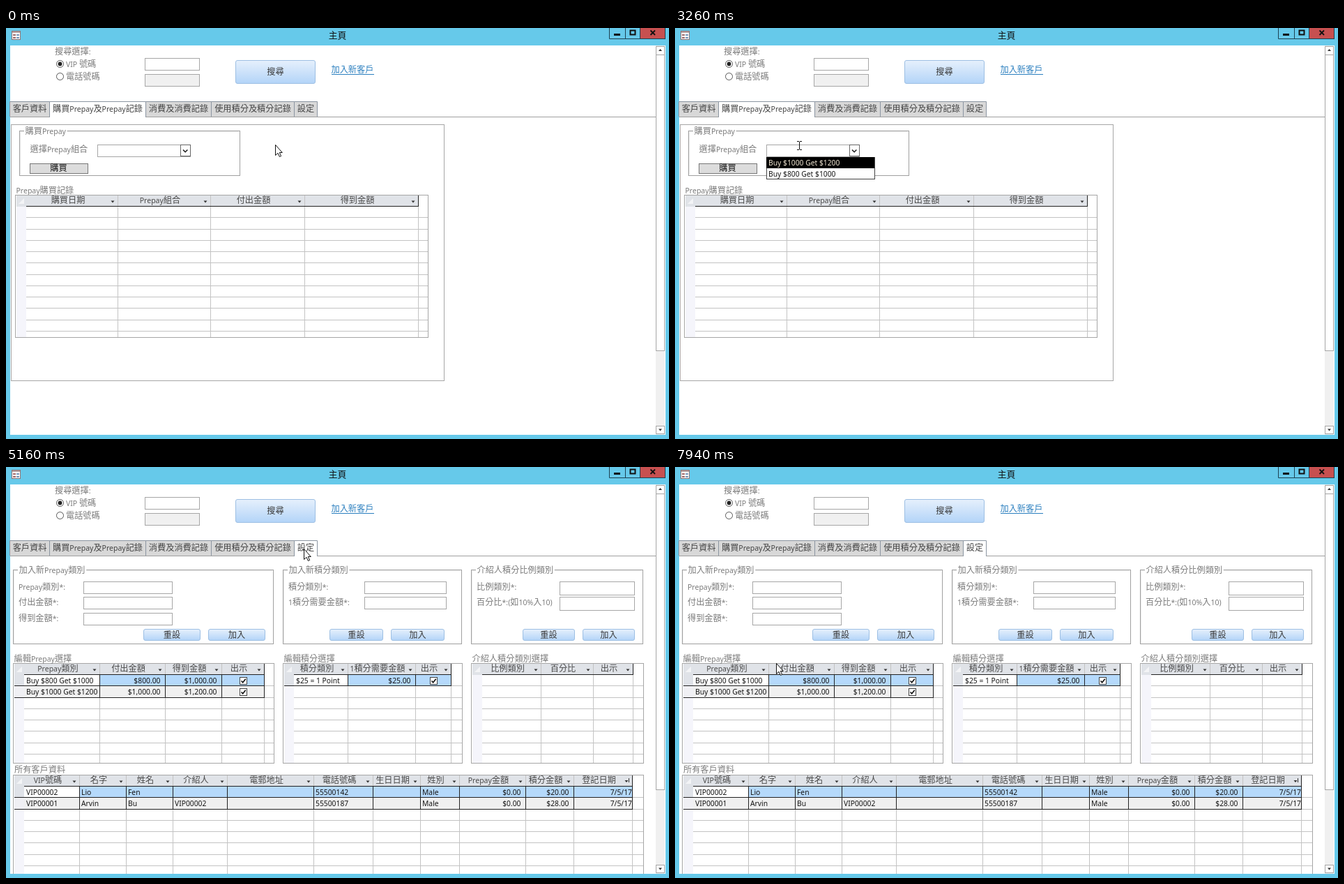
An HTML page for the animation above (8 s loop, 951x589 px).

```html
<!DOCTYPE html>
<html lang="zh-Hant">
<head>
<meta charset="utf-8">
<title>主頁</title>
<style>
  html, body { margin: 0; width: 100%; height: 100%; overflow: hidden; background: #66c9ea; }
  svg { display: block; }
  text { font-family: "Noto Sans CJK TC", "Noto Sans CJK", sans-serif; }
  tspan { font-family: "Noto Sans", "Open Sans", sans-serif; font-size: .86em; }
</style>
</head>
<body>
<svg id="stage" width="951" height="589" viewBox="0 0 951 589"></svg>
<script>
const LOOP = 8000, STEP = 78, BLINK = 530;
const PRESS = 1840, LIST_OPEN = 1900, SWITCH = 5030, FILLED = 5160;
const GREY = '#7c7c7c', INK = '#161616', LINE = '#a6a6a6', CELL = '#c3c3c3', DARK = '#222';
const EM = 12.2, ROW = 16.27;

// Drawing helpers: each returns SVG markup
const rect = (x, y, w, h, fill, stroke, extra = '') => stroke
  ? `<rect x="${x + .5}" y="${y + .5}" width="${w - 1}" height="${h - 1}" fill="${fill}" stroke="${stroke}" ${extra}/>`
  : `<rect x="${x}" y="${y}" width="${w}" height="${h}" fill="${fill}" ${extra}/>`;
const path = (d, stroke, fill = 'none', extra = '') =>
  `<path d="${d}" stroke="${stroke}" fill="${fill}" ${extra}/>`;
const hline = (x1, x2, y, c) => path(`M${x1} ${y + .5}H${x2}`, c);
const vline = (x, y1, y2, c) => path(`M${x + .5} ${y1}V${y2}`, c);
const text = (s, x, cy, fill = GREY, anchor = 'start', size = EM) =>
  `<text x="${x}" y="${cy + 4.3}" fill="${fill}" font-size="${size}" text-anchor="${anchor}">` +
  s.replace(/[\x20-\x7e]+/g, '<tspan>$&</tspan>') + '</text>';
const textWidth = s => [...s].reduce((w, c) => w + (c < '\x7f' ? 5.7 : EM), 0);
const group = (id, ...parts) => `<g id="${id}">${parts.join('')}</g>`;
const triangle = (x, y, flip = 1) => path(`M${x - 2.5} ${y - flip}h5l-2.5 ${3 * flip}z`, 'none', '#333');
const inside = (x, y, [l, t, w, h]) => x >= l && x < l + w && y >= t && y < t + h;

// Every input is remembered, so the pointer can turn into a text beam over it
let fields = [];
function input(x, y, w, h, fill = '#fff') {
  fields.push([x, y, w, h]);
  return rect(x, y, w, h, fill, LINE);
}

const button = (x, y, w, h, label) =>
  rect(x, y, w, h, 'url(#blue)', '#9dbfe3', 'rx="2.5"') + text(label, x + w / 2, y + h / 2, '#3a3a3a', 'middle');

function fieldset(x, y, w, h, label) {
  return rect(x, y, w, h, 'none', '#a0a0a0') +
    path(`M${x + 1.5} ${y + h - 2}V${y + 1.5}H${x + w - 2}`, '#ececec') +
    rect(x + 7, y - 1, textWidth(label) + 3, 4, '#fff') + text(label, x + 8.5, y + 1);
}

function checkbox(x, y) {
  return rect(x - 5, y - 5, 11, 11, '#fff', '#444') +
    path(`M${x - 2.5} ${y + .5}l2.2 2.3 4-5`, '#111', 'none', 'stroke-width="1.7"');
}

function cell(v, left, right, cy) {
  if (v === 'on') return checkbox(Math.round((left + right) / 2), cy);
  if (/^\$[\d,]+\.\d\d$/.test(v)) return text(v, right - 6.5, cy, INK, 'end', 12);
  if (/\//.test(v)) return text(v, right, cy, INK, 'end', 12);
  return text(v, left + 3, cy, INK, 'start', 12);
}

// columns: { label: width }
function grid(x, y, w, h, columns, rows = [], sorted = false) {
  const left = x + 15, head = y + 16, bottom = y + h;
  const rowY = k => Math.round(head + ROW * k);
  let last = left;
  const cols = Object.entries(columns).map(([label, width]) => ({ label, a: last, b: last += width }));

  let s = rect(x, y, w, h, '#fff') + rect(x + 1, head, 14, bottom - head, '#f5f5fb') +
    rect(x + 1, y + 1, last - x, 16, '#e0e3e8') + path(`M${x + 12} ${y + 5}v8h-8z`, 'none', '#f3f4f6');
  for (let k = 1; rowY(k) < bottom; k++) s += hline(left, x + w, rowY(k), CELL);
  for (const { b } of cols) s += vline(b, y + 1, bottom, CELL);

  rows.forEach((row, k) => {
    const top = rowY(k) + 1, size = rowY(k + 1) - top;
    s += rect(x + 1, top, 14, size, k ? '#f0f0f4' : '#dfe2e8');
    row.forEach((v, i) => {
      const { a, b } = cols[i];
      s += rect(a + (i > 0), top, b - a, size, k ? '#f0f0f0' : i ? '#b5d9fb' : '#fff') +
        vline(b, top, top + size, DARK) + cell(v, a, b, top + 8);
    });
    s += hline(x + 1, last + 1, top + size, DARK);
  });

  cols.forEach(({ label, a, b }, i) => {
    s += text(label, (a + b) / 2 - 5.5, y + 8, '#4a4a4a', 'middle');
    if (sorted && i === cols.length - 1) s += path(`M${b - 4.5} ${y + 5}v6`, '#333') + triangle(b - 8, y + 9);
    else s += triangle(b - 7, y + 9.5);
  });
  return s + hline(left, last + 1, head, DARK) + vline(last, y + 1, head, DARK) + rect(x - 1, y, w + 1, h + 1, 'none', LINE);
}

// Window, scroll bar and search bar
const icon = rect(8, 4, 13, 13, '#fff', '#8d7373') + rect(9, 5, 11, 2, '#b9a2a2') +
  [9, 13].map(y => rect(10, y, 4, 2, '#a06a6a') + rect(15, y, 4, 2, '#7796b8')).join('');

const windowBar =
  rect(0, 0, 951, 589, '#66c9ea') + rect(6, 25, 940, 558, '#fff') + icon +
  text('主頁', 475.5, 11, '#111', 'middle', 12.8) +
  rect(909, 0, 37, 15, '#c75050') + path('M865.5 0V15.5H946M888.5 0V15M909.5 0V15M945.5 0V15', '#1d4252') +
  rect(872, 8, 9, 3, '#111') + path('M895.5 3.5h7v6h-7z', '#111', 'none', 'stroke-width="2"') +
  path('M924.5 3.5l6.5 6.5M931 3.5l-6.5 6.5', '#111', 'none', 'stroke-width="1.8"');

const scroll =
  rect(932, 25, 13, 558, '#f0f0f0') + rect(932, 26, 13, 13, '#fff', LINE) +
  rect(932, 38, 13, 425, '#fff', LINE) + rect(932, 570, 13, 12, '#fff', LINE) +
  triangle(938.5, 32, -1) + triangle(938.5, 575.5);

const radio = (y, on) => `<circle cx="77.5" cy="${y}" r="5" fill="#fff" stroke="#555"/>` +
  (on ? `<circle cx="77.5" cy="${y}" r="2.9" fill="#222"/>` : '');

const search =
  text('搜尋選擇:', 70, 34) + radio(51.5, true) + text('VIP 號碼', 86, 52) +
  radio(69.5) + text('電話號碼', 86, 70) +
  input(199, 43, 79, 18) + input(199, 66, 79, 18, '#f0f0f0') +
  button(329, 46, 115, 34, '搜尋') +
  text('加入新客戶', 466.5, 60, '#2b7fbf') + hline(467, 528, 66, '#2b7fbf');

// Tabs are as wide as their names
let tabEnd = 5;
const tabBoxes = ['客戶資料', '購買Prepay及Prepay記錄', '消費及消費記錄', '使用積分及積分記錄', '設定'].map(name => {
  const a = Math.round(tabEnd);
  tabEnd += textWidth(name) + 8.6;
  return { name, a, b: Math.round(tabEnd) };
});
const tabs = hline(6, 932, 127, '#a0a0a0') + tabBoxes.map(({ name, a, b }) =>
  `<path class="tab" stroke="#8b95a1"/>` + text(name, (a + b) / 2 + .5, 116, '#444', 'middle')).join('');

// Purchase page
fields = [];
const DROP = [250, 167, 15, 17];
const purchase = group('purchase',
  rect(7, 138, 622, 368, '#fff', LINE),
  fieldset(19, 147, 317, 65, '購買Prepay'),
  text('選擇Prepay組合', 34.5, 174),
  input(131, 167, 134, 18),
  `<rect id="drop" x="250.5" y="167.5" width="14" height="16"/>`,
  path('M254 174.5l3.2 3.2 3.2-3.2', DARK, 'none', 'stroke-width="1.6"'),
  rect(34, 194, 84, 15, '#dcdcdc', '#777'), text('購買', 75.5, 201, INK, 'middle'),
  text('Prepay購買記錄', 14.5, 233),
  grid(14, 239, 592, 204, { 購買日期: 131, Prepay組合: 133, 付出金額: 135, 得到金額: 163 }),
  group('caret', rect(132, 167, 1, 15, '#000')));
const purchaseFields = fields;

const list = group('list', rect(131, 185, 156, 32, '#fff', '#444'),
  ['Buy $1000 Get $1200', 'Buy $800 Get $1000'].map((s, i) =>
    `<g class="item">${rect(131, 185 + 16 * i, 155, 16, '#000')}${text(s, 134, 193 + 16 * i, INK, 'start', 12)}</g>`).join(''));

// Settings page: three panels, each with a table below, and a wide table
fields = [];
const panels = [
  { x: 10, w: 374, title: '加入新Prepay類別', labels: ['Prepay類別*:', '付出金額*:', '得到金額*:'],
    inset: 101, field: 128, tall: 18, action: 82, pad: 12, caption: '編輯Prepay選擇',
    columns: { Prepay類別: 108, 付出金額: 94, 得到金額: 81, 出示: 61 },
    rows: [['Buy $800 Get $1000', '$800.00', '$1,000.00', 'on'], ['Buy $1000 Get $1200', '$1,000.00', '$1,200.00', 'on']] },
  { x: 397, w: 257, title: '加入新積分類別', labels: ['積分類別*:', '1積分需要金額*:'],
    inset: 117, field: 118, tall: 18, action: 77, pad: 25, caption: '編輯積分選擇',
    columns: { 積分類別: 77, '1積分需要金額': 97, 出示: 51 },
    rows: [['$25 = 1 Point', '$25.00', 'on']] },
  { x: 667, w: 247, title: '介紹人積分比例類別', labels: ['比例類別*:', '百分比*:(如10%入10)'],
    inset: 127, field: 108, tall: 20, action: 75, pad: 12, caption: '介紹人積分類別選擇',
    columns: { 比例類別: 84, 百分比: 75, 出示: 57 } }
];

function panel(p) {
  const add = p.x + p.w - p.pad - p.action;
  return fieldset(p.x, 147, p.w, 107, p.title) +
    p.labels.map((label, i) => text(label, p.x + 8, 171.5 + 22.5 * i) +
      input(p.x + p.inset, Math.floor(164 + 22.5 * i), p.field, p.tall)).join('') +
    button(add - p.action - 11, 232, p.action, 17, '重設') + button(add, 232, p.action, 17, '加入') +
    text(p.caption, p.x + 1.5, 275);
}
const panelGrid = p => grid(p.x + 1, 281, p.w, 143, p.columns, p.rows);
const clients = grid(11, 441, 904, 150,
  { VIP號碼: 79, 名字: 67, 姓名: 67, 介紹人: 78, 電郵地址: 124, 電話號碼: 85, 生日日期: 68, 姓別: 56, Prepay金額: 95, 積分金額: 69, 登記日期: 84 }, [
  ['VIP00002', 'Lio', 'Fen', '', '', '55500142', '', 'Male', '$0.00', '$20.00', '7/5/17'],
  ['VIP00001', 'Arvin', 'Bu', 'VIP00002', '', '55500187', '', 'Male', '$0.00', '$28.00', '7/5/17']], true);

// Tables that fill late show the page behind them
const lateBoxes = [...panels.slice(0, 2).map(p => [p.x + 1, 281, p.w, 143]), [11, 441, 904, 150]];
const settings = group('settings',
  lateBoxes.map(([x, y, w, h]) => rect(x - 1, y, w + 1, h + 1, 'none', LINE)).join(''),
  group('tables', panels.slice(0, 2).map(panelGrid).join(''), clients),
  panelGrid(panels[2]),
  panels.map(panel).join(''), text('所有客戶資料', 12, 434));
const settingsFields = [...fields, [26, 298, 283, 32]];

const pointer =
  path('M.5 .5V15.5L4 12.3 6.4 17.5 8.6 16.5 6.3 11.5H10.3z', '#111', '#fff', 'id="arrow"') +
  path('M-3-5.5H0M1-5.5H4M.5-5V6M-3 6.5H0M1 6.5H4', '#111', 'none', 'id="beam"');

const stage = document.getElementById('stage');
stage.innerHTML =
  `<defs><linearGradient id="blue" x2="0" y2="1"><stop stop-color="#e6f0fc"/><stop offset="1" stop-color="#b3d4f8"/></linearGradient>
  <clipPath id="holes">${lateBoxes.map(b => rect(...b, '#000')).join('')}</clipPath></defs>` +
  windowBar + search + tabs + purchase + list + settings + scroll +
  rect(0, 583, 951, 6, '#66c9ea') + pointer;

// Pointer: straight glides, or arcs that swing sideways by `swing`
const poses = [{ t: 0, x: 386, y: 167, hot: -1 }];
function glide(from, to, x, y, swing = 0) {
  const start = poses.at(-1), gaps = Math.round((to - from) / STEP);
  for (let i = 0; i <= gaps; i++) {
    const u = (i + 1) / (gaps + 1);
    const px = Math.round(start.x + (x - start.x) * u + swing * Math.sin(Math.PI * u));
    const py = Math.round(start.y + (y - start.y) * u);
    const t = from + (gaps && (to - from) * i / gaps);
    let { hot } = poses.at(-1);
    if (t >= LIST_OPEN && inside(px, py, [131, 185, 155, 32])) hot = py < 201 ? 0 : 1;
    poses.push({ t, x: px, y: py, hot });
  }
}
glide(410, 810, 265, 176);
glide(1460, 1580, 257, 174);
glide(2190, 2990, 180, 219, -30);
glide(3070, 3260, 178, 168);
glide(3320, 3760, 160, 223, -50);
glide(3880, 4090, 272, 154);
glide(4500, 4890, 427, 117);
glide(5430, 5960, 236, 168);
glide(6350, 6350, 186, 182);
glide(6450, 7080, 150, 363, -149);
glide(7190, 7940, 145, 281, 246);

const $ = id => document.getElementById(id);
const tabEls = [...stage.querySelectorAll('.tab')], items = [...stage.querySelectorAll('.item')];
const show = (el, on) => { el.style.display = on ? '' : 'none'; };
const set = (el, attrs) => { for (const k in attrs) el.setAttribute(k, attrs[k]); };

function draw(t) {
  const { x, y, hot } = poses.findLast(p => p.t <= t);
  const switched = t >= SWITCH, filled = t >= FILLED;

  show($('purchase'), !filled);
  set($('purchase'), { 'clip-path': switched ? 'url(#holes)' : 'none' });
  show($('settings'), switched);
  show($('tables'), filled);

  tabBoxes.forEach(({ a, b }, i) => {
    const on = i === (switched ? 4 : 1), foot = on ? 128 : 127;
    const hover = inside(x, y, [a, 106, b - a, 21]);
    set(tabEls[i], {
      d: `M${a + .5} ${foot}V105.5H${b + .5}V${foot}`,
      fill: on ? '#fff' : hover ? '#e4eef8' : '#d8d8d8'
    });
  });

  const over = inside(x, y, DROP), pressed = t >= PRESS && t < LIST_OPEN;
  set($('drop'), { fill: pressed ? '#8cc4ec' : over ? '#c0e0f6' : '#fff', stroke: over ? '#2f6c9c' : '#666' });
  show($('caret'), t >= 220 && Math.floor((t - 220) / BLINK) % 2 === 0 && !switched);

  show($('list'), t >= LIST_OPEN && !switched);
  items.forEach((el, i) => {
    show(el.firstChild, i === hot);
    set(el.lastChild, { fill: i === hot ? '#f0e6d2' : INK });
  });

  const beam = (switched ? settingsFields : purchaseFields).some(b => inside(x, y, b)) && (switched || !over);
  for (const id of ['arrow', 'beam']) set($(id), { transform: `translate(${x} ${y})` });
  show($('arrow'), !beam);
  show($('beam'), beam);
}

const began = performance.now();
function tick() {
  draw((performance.now() - began) % LOOP);
  requestAnimationFrame(tick);
}
tick();
</script>
</body>
</html>
```
